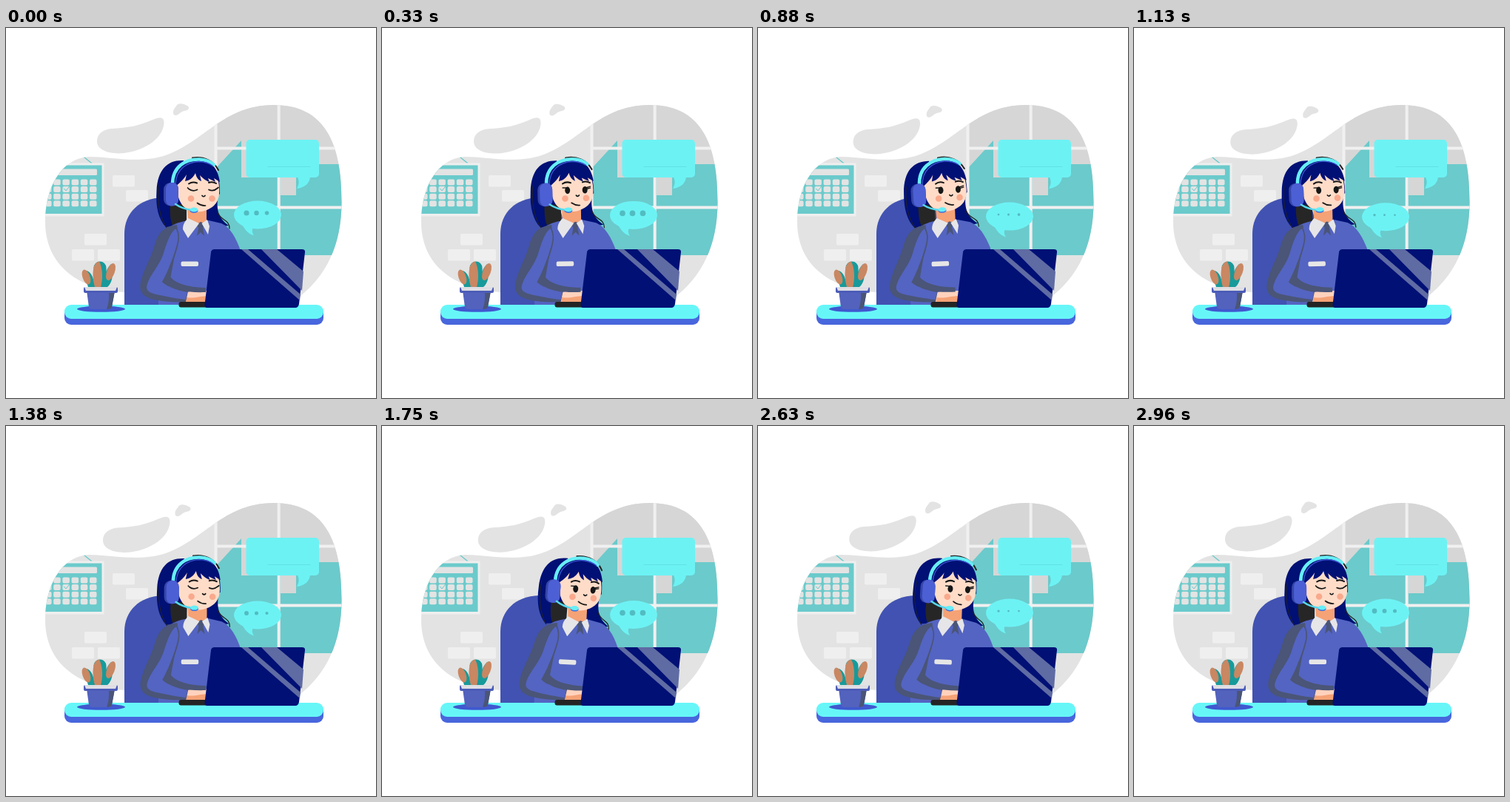
Animation of 500x500 px, one loop 3000 ms. Source, as an HTML page:

```html
<!DOCTYPE html>
<html lang="en">
<head>
<meta charset="utf-8">
<title>Support desk</title>
<style>
html, body { margin: 0; width: 100%; height: 100%; overflow: hidden; background: #fff; }
svg { display: block; width: 100vw; height: 100vh; }
.navy { fill: #001075; }
.suit { fill: #5464c2; }
.shade { fill: #4a5577; }
.line { fill: none; stroke-linecap: round; stroke-linejoin: round; }
</style>
</head>
<body>
<svg viewBox="0 0 500 500">
  <defs>
    <clipPath id="room"><path d="M53 262C53 215 75 176 112 174C140 174 165 181 200 176C262 165 287 104 362 104C432 104 454 158 453.500 235C453.500 294 432 335 398 362L160 357C90 352 53 315 53 262Z"/></clipPath>
  </defs>

  <g clip-path="url(#room)">
    <path fill="#e3e3e3" d="M50 100H456V365H50Z"/>
    <!-- window -->
    <path fill="#d6d6d6" d="M283 100H456V307H283Z"/>
    <path fill="#6bcacb" d="M285 188L318 152V202H371V184H456V307H285Z"/>
    <path fill="#d6d6d6" d="M319 152h6v50h-6zM371 202h21v24h-21z"/>
    <path class="line" stroke="#f0f0f0" stroke-width="4" d="M283.500 100V307M368.700 100V307M284 162.500H456M284 242.500H456"/>
    <!-- calendar -->
    <path class="line" stroke="#6bcacb" stroke-width="1.500" d="M105 174L116 183"/>
    <path fill="#efefef" d="M50 182.500H132.500V254.500H50Z"/>
    <path fill="#6bcacb" d="M50 185.500H129.500V251H50Z"/>
    <rect x="60" y="190.500" width="63" height="8.500" rx="1.500" fill="#e3e3e3"/>
    <g id="days" fill="#e3e3e3"></g>
    <path class="line" stroke="#6bcacb" d="M78.500 217L81 220L85 215"/>
    <g id="bricks" fill="#efefef"></g>
  </g>

  <path id="cloud" fill="#e3e3e3" d="M123 153C123 143 131 137 143 136C165 135 180 132 198 124C207 120 214 119 213.500 129C212 148 190 165 160 169C139 171 123 165 123 153Z"/>
  <path id="drop" fill="#e3e3e3" d="M226 114C226 109 229 108 231 104C234 101 240 102 245 105C249 108 247 111 241 112C236 113 234 117 230 118C227 118 226 117 226 114Z"/>

  <!-- speech bubbles -->
  <g fill="#6df2f4">
    <rect x="324.500" y="151" width="98.500" height="51" rx="5"/>
    <path d="M393 200C397 206 396 212 393 217C403 216 411 210 411 200Z"/>
    <path class="line" stroke="#5fdde0" stroke-width=".8" d="M354 187.500H411"/>
  </g>
  <g id="chat" fill="#6df2f4">
    <ellipse cx="340" cy="252.500" rx="32" ry="19"/>
    <path d="M317 264C323 270 324 277 335 280.500C332 276 332 272 335 268Z"/>
    <g id="dots" fill="#52bcc1"></g>
  </g>

  <path fill="#4152b2" d="M160 376V278C160 250 180 230 212 229C235 229 245 245 245 270V376Z"/>

  <!-- hair behind the body -->
  <g class="head">
    <path class="navy" d="M240 179C219 178 205 190 203.500 220C202 242 206 258 216 269L243 266V200Z"/>
    <path class="line" stroke="#222" d="M207 212C204 236 208 256 217 270"/>
    <path fill="#262626" d="M222 238H244V262C238 264 232 268 228 272C222 264 221 252 222 238Z"/>
    <path class="navy" d="M270 215L287 226C283 246 288 258 301 267C288 270 274 264 268 258Z"/>
    <path class="line" stroke="#222" stroke-width="1.300" d="M286 249C290 261 302 258 302 271"/>
  </g>

  <!-- body -->
  <g class="body">
    <path class="suit" d="M241 261C228 264 221 267 216 276L206 330V378H285L317 301C311 284 303 269 291 264L274 260Z"/>
    <path fill="#f5a276" d="M245 243H271V260L262 267L246 261Z"/>
    <path class="shade" d="M258 265L263 262L268 264L266 270L268 281L263 276L258 281L260 271Z"/>
    <path fill="#e6e6e9" d="M246 257C241 262 239 266 239 272L246 284L261 264ZM272 259L275 268L273 279L264.500 264Z"/>
    <rect x="236.500" y="315.500" width="23.500" height="6.500" rx="2" fill="#e6e6e6"/>
  </g>
  <g id="hand">
    <path fill="#ffd2bd" d="M242 358C252 354 262 355 275 355V371H242Z"/>
    <path fill="#f5a276" d="M244 364C254 366 262 362 275 362V371H243Z"/>
  </g>
  <g id="arm">
    <path class="shade" d="M231 266C213 268 206 277 201 293C195 314 185 327 181.500 346C180 358 187 364 200 367C214 370 230 371 243 370L246 356L220 350L233 280Z"/>
    <path class="suit" d="M231 270C223 274 218 288 213 304C207 323 193 334 190 350C190 357 198 359 208 361C222 364 233 366 243 367L245 357C229 354 217 349 211 343C219 329 230 302 233 282Z"/>
    <path class="shade" d="M211 343C215 338 217 334 219 330C222 341 236 350 270 351V357C245 358 224 354 211 343Z"/>
    <path class="line" stroke="#4a5577" stroke-width="1.600" d="M229 269C236 279 233 290 229 303C226 314 221 321 219 332"/>
  </g>

  <!-- head -->
  <g class="head">
    <path class="navy" d="M228 226C222 195 236 177 258 177C278 177 290 194 289 224L278 236H236Z"/>
    <path fill="#ffdcc8" d="M232 204C240 192 278 190 286 203C290 219 289 233 281 240C272 248 258 251 247 246C236 241 229 228 232 204Z"/>
    <path class="navy" d="M229 214C226 187 241 178 258 178C275 178 286 187 289 208L281 203L283 208L273 203L275 208C269 206 266 203 262 199L264 207C259 205 257 201 256 196C252 204 247 206 242 207L244 198C240 205 235 209 229 214Z"/>
    <g fill="#f9a98c"><circle cx="250" cy="230.500" r="4.300"/><circle cx="278.500" cy="230.500" r="4.300"/></g>
    <g class="line" stroke="#161616" stroke-width="1.700">
      <path stroke-width="2" d="M247 210.500Q252 207 258 209.500M274 209Q279 207 284 210"/>
      <path stroke-width="1.700" d="M265 226.500Q267 229 269 226.500M258.500 236.500Q264 240.500 269.500 240"/>
      <path id="shut" d="M247 217.500Q252 221.500 258.500 218.500M274 218.500Q280 221.500 285 217M247 217.500L245.500 216M285 217L287 215.500"/>
    </g>
    <g id="open">
      <ellipse cx="253.500" cy="219.500" rx="3.500" ry="4.800" fill="#161616"/>
      <ellipse cx="277" cy="219.500" rx="3.500" ry="4.800" fill="#161616"/>
      <path class="line" stroke="#161616" stroke-width="1.400" d="M247 216L252 216M279 216.500L284.500 215M280 218L284.500 217"/>
    </g>
    <path class="line" stroke="#222" stroke-width="2" d="M252 175.500C268 173 281 180 287 192"/>
    <path class="line" stroke="#67eef6" stroke-width="4.500" d="M225 211C225 187 243 177 261 177.500C271 178 277 181 281 185"/>
    <path class="line" stroke="#3b55d2" stroke-width="1.300" d="M229 211C230 191 244 181 261 180.500C270 181 275 183 279 186"/>
    <rect x="213" y="209" width="20" height="31.500" rx="9" fill="#3546a8"/>
    <rect x="216" y="209" width="17" height="31.500" rx="8" fill="#4c5fd4"/>
    <path class="line" stroke="#55d9ef" stroke-width="2.500" d="M229 238C236 243 243 245 251 246"/>
    <ellipse cx="254" cy="247" rx="5.500" ry="3" fill="#3b6fe0"/>
    <ellipse cx="254" cy="245.500" rx="5.500" ry="3" fill="#67eef6"/>
  </g>

  <!-- desk -->
  <rect x="79" y="376" width="350" height="25" rx="9" fill="#4866dd"/>
  <rect x="79" y="374" width="350" height="19" rx="9" fill="#67f6f8"/>
  <ellipse cx="128.500" cy="379.800" rx="32.500" ry="4" fill="#4058cf"/>
  <rect x="233.500" y="370" width="45" height="7.500" rx="3" fill="#242424"/>
  <path class="navy" d="M282 299H400Q404.500 299 404 303L396 373Q395 378 391 378H272Q268 378 268.500 374L277 303Q277.500 299 282 299Z"/>
  <path fill="#5f6ba3" d="M345 299H366L402 329L400 355ZM318 299H327L398 360L397 368Z"/>

  <!-- cactus -->
  <g fill="#189a9a">
    <path d="M104 328C112 326 118 332 120 350H111Z"/>
    <rect x="118.500" y="315.500" width="17" height="42" rx="8.500"/>
    <path d="M142 319C133 328 134 336 130 350H137C143 345 146 335 142 319Z"/>
  </g>
  <g fill="#c98762">
    <ellipse cx="108.500" cy="336.500" rx="5" ry="10.500" transform="rotate(-20 108.500 336.500)"/>
    <path d="M126 315.500C116 317 116 336 120 350H128C131 340 131 325 126 315.500Z"/>
    <ellipse cx="141.500" cy="329.500" rx="5.300" ry="12" transform="rotate(20 141.500 329.500)"/>
  </g>
  <path fill="#5262bd" d="M109 355H147L143 377Q142 380 138 380H117Q113 380 112 377Z"/>
  <path class="shade" d="M139 356H147L143 377Q142 380 136 380Q140 370 139 356Z"/>
  <rect x="105" y="350" width="46" height="8" rx="2" fill="#4c5cb8"/>
  <path fill="#dedee4" d="M106 350H150L148 355H108Z"/>
</svg>
<script>
const LOOP = 3000;
const $ = id => document.getElementById(id);
const ease = u => (1 - Math.cos(Math.PI * u)) / 2;
const wave = (t, period) => ease(2 * t / period);
const move = (id, x, y) => $(id).setAttribute('transform', `translate(${x} ${y})`);

const box = (x, y, w, h, r) => `<rect x="${x}" y="${y}" width="${w}" height="${h}" rx="${r}"/>`;
let cells = '';
for (let row = 0; row < 4; row++)
  for (let col = 0; col < 6; col++)
    cells += box(52 + col * 12.2, 204.500 + row * 9.6, 9.500, 8, 2);
$('days').innerHTML = cells;
$('bricks').innerHTML = [[144, 199], [162, 219], [106, 278], [89, 299], [124, 299]]
  .map(([x, y]) => box(x, y, 30, 15.500, 2)).join('');
$('dots').innerHTML = [325, 338.500, 352.500]
  .map(x => `<circle cx="${x}" cy="250" r="4"/>`).join('');

// Sideways lean of the head in pixels: left, then right, then back to rest.
function lean(t) {
  if (t < 750) return -6.5 * ease(t / 750);
  if (t < 2250) return -6.5 + 19 * ease((t - 750) / 1500);
  return 12.5 * (1 - ease((t - 2250) / 750));
}

function draw(t) {
  const x = lean(t), angle = x * .38;
  const bend = `rotate(${angle} 245 365)`;
  for (const el of document.querySelectorAll('.body')) el.setAttribute('transform', bend);
  for (const el of document.querySelectorAll('.head'))
    el.setAttribute('transform', `${bend} rotate(${angle * .4} 257 255)`);
  $('arm').setAttribute('transform', `translate(${x * .5} 0) rotate(${angle * .35} 240 368)`);
  move('hand', x * .35, 0);

  const beat = t % 1500, shut = beat < 100 || beat > 1330;
  $('shut').style.display = shut ? '' : 'none';
  $('open').style.display = shut ? 'none' : '';

  const drift = t < 2800 ? wave(t, 2800) : 0;
  move('cloud', 8 * drift, 1.5 * drift);
  move('drop', 2.5 * drift, 4 * drift);
  move('chat', 0, 3 * drift);

  [...$('dots').children].forEach((dot, i) => {
    const size = .7 + .35 * Math.cos(2 * Math.PI * (t - 200 - 80 * i) / 1500);
    dot.setAttribute('r', 3.8 * Math.min(1, size));
  });
}

function tick() {
  draw(performance.now() % LOOP);
  requestAnimationFrame(tick);
}
tick();
</script>
</body>
</html>
```
